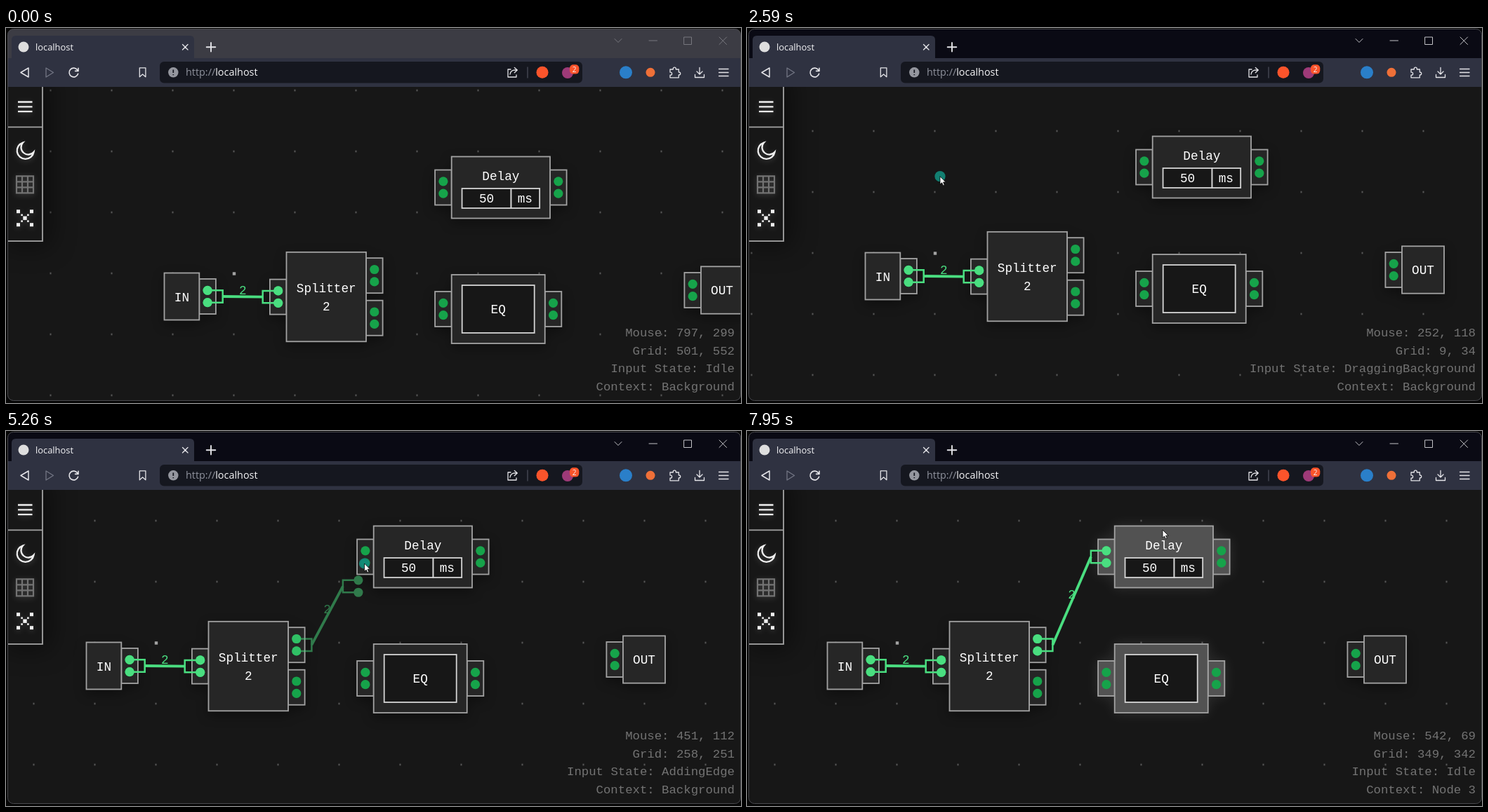
An HTML page that plays this animation: 1047x535 px, repeating every 8000 ms.

```html
<!DOCTYPE html>
<html lang="en">
<head>
<meta charset="utf-8">
<title>Audio graph editor</title>
<style>
html, body { margin: 0; width: 100%; height: 100%; overflow: hidden; background: #060606; }
svg { display: block; width: 1047px; height: 535px; }
.ui { font-family: "Open Sans", "Noto Sans", sans-serif; fill: #f4f4f6; }
.mono { font: 17.7px "Liberation Mono", "Noto Sans Mono", monospace; fill: #fff; text-anchor: middle; }
.status { font: 17.32px "Liberation Mono", "Noto Sans Mono", monospace; fill: #737373; text-anchor: end; }
.ico { fill: none; stroke: #e4e4e8; stroke-width: 1.3; stroke-linejoin: round; stroke-linecap: round; }
.node { filter: drop-shadow(0 6px 8px rgba(0,0,0,.35)); }
.box { fill: #262626; stroke: #a3a3a3; stroke-width: 1.8; }
.inset { fill: #171717; stroke: #d4d4d4; stroke-width: 1.8; }
.port { fill: #16a34a; }
.port.on { fill: #4ade80; }
.node.sel { filter: drop-shadow(0 0 9px rgba(255,255,255,.1)); }
.sel .box { fill: #525252; }
.edge { fill: none; stroke: #4ade80; stroke-width: 2.5; }
.edge .wire { stroke-width: 3.8; }
.edge text { fill: #4ade80; stroke: none; }
.edge circle { fill: #4ade80; stroke: none; }
</style>
</head>
<body>
<svg id="stage" viewBox="0 0 1047 535"></svg>
<script>
const LOOP = 8000, SCALE = 1.0875, PAN_SCALE = 1.08, LAG = 80;
const GRAB = 1950, PAN_END = 3030, DROP = 3200, CONNECT = 4940, SNAP = 5500, CONFIRM = 6140;
const PICK_DELAY = 7200, PICK_EQ = 7500;
const $ = id => document.getElementById(id);
const rect = (x, y, w, h, attrs = '') => `<rect x="${x}" y="${y}" width="${w}" height="${h}" ${attrs}/>`;
const dot = (x, y, r, attrs = '') => `<circle cx="${x}" cy="${y}" r="${r}" ${attrs}/>`;
const path = (d, attrs = '') => `<path d="${d}" ${attrs}/>`;
const label = (x, y, s) => `<text class="mono" x="${x}" y="${y}">${s}</text>`;
const clamp = (v, a, b) => Math.min(b, Math.max(a, v));
const smooth = u => u * u * (3 - 2 * u);

// Cursor moves: start, end, destination
const home = [870, 409.5];
const moves = [
  [160, 900, 94, 66], [1660, GRAB, 334.75, 242.7], [GRAB, 2590, 275, 211.7], [2590, PAN_END, 223, 194],
  [3220, 4200, 400, 292], [4290, 4550, 405, 306], [CONNECT, 5260, 510.5, 189], [SNAP, 5740, 439.3, 200],
  [6380, 6740, 545, 166], [6800, 7160, 575, 141], [7190, 7450, 600, 320], [7560, 7950, 592, 141]];

function cursorAt(t) {
  let [x, y] = home;
  for (const [a, b, tx, ty] of moves) {
    const k = smooth(clamp((t - a) / (b - a), 0, 1));
    x += (tx - x) * k;
    y += (ty - y) * k;
  }
  return [x, y];
}
// The app sees the pointer late, in page units
function mouseAt(t) {
  const [x, y] = cursorAt(t - LAG);
  return [(x - 3) / SCALE, Math.max(0, (y - 84) / SCALE)];
}
function panAt(t) {
  const [x0, y0] = mouseAt(GRAB + LAG), [x, y] = mouseAt(clamp(t, GRAB + LAG, PAN_END + LAG));
  return [296 + x - x0, 245 + y - y0];
}
const panEnd = panAt(LOOP);

const PORT_GAP = 8.7, SOCKET = 11.8;
function socket(x, y) {
  const port = s => dot(x, y + s * PORT_GAP, 6.6, 'class="port"');
  return rect(x - SOCKET, y - 25, 2 * SOCKET, 50, 'class="box"') + port(-1) + port(1);
}
const inset = (x, y, w, h) => rect(x, y, w, h, 'class="inset"');

// Nodes: body box, socket heights on each side, inner content around the centre
const specs = [
  { id: 'in', x: 114.5, y: 301.5, w: 49.8, h: 67, ins: [], outs: [335], body: c => label(c, 341.5, 'IN') },
  { id: 'splitter', x: 288.5, y: 271.8, w: 113.5, h: 127.5, ins: [335.6], outs: [305.2, 365.7],
    body: c => label(c, 329, 'Splitter') + label(c, 355, '2') },
  { id: 'delay', x: 523.7, y: 135.5, w: 140.3, h: 88, ins: [179.5], outs: [179.5],
    body: c => label(c, 168.5, 'Delay') + inset(c - 55.3, 181, 70, 28) + inset(c + 14.7, 181, 40.6, 28) +
      label(c - 20.3, 201, '50') + label(c + 34.5, 201, 'ms') },
  { id: 'eq', x: 523.7, y: 304, w: 133, h: 98, ins: [353], outs: [353],
    body: c => inset(c - 51.5, 319, 103, 68) + label(c, 359, 'EQ') },
  { id: 'out', x: 879, y: 292.3, w: 60, h: 67.4, ins: [326], outs: [], body: c => label(c, 332, 'OUT') }];

const drawNode = ({ id, x, y, w, h, ins, outs, body }) => `<g class="node" id="${id}">` +
  ins.map(v => socket(x - SOCKET, v)).join('') + outs.map(v => socket(x + w + SOCKET, v)).join('') +
  rect(x, y, w, h, 'class="box"') + body(x + w / 2) + '</g>';
const outPort = n => [n.x + n.w + SOCKET, n.outs[0]];
const inPort = n => [n.x - SOCKET, n.ins[0]];

function edge([x0, y0], [x1, y1]) {
  const h = PORT_GAP, a = x0 + 21.6, b = x1 - 22;
  const ends = [[x0, y0], [x1, y1]].map(([x, y]) => dot(x, y - h, 6.6) + dot(x, y + h, 6.6)).join('');
  return path(`M${x0} ${y0 - h}H${a}V${y0 + h}H${x0}M${x1} ${y1 - h}H${b}V${y1 + h}H${x1}`) +
    path(`M${a} ${y0}L${b} ${y1}`, 'class="wire"') + ends + label((a + b) / 2, (y0 + y1) / 2 - 3.4, '2');
}

// Block lettering stroked on a 12 by 17 cell
const glyphs = {
  N: 'M1.5 17V0M10.5 0V17M3 5h1.5v2h1.5v2h1.5v2h1.5',
  O: 'M1.5 1.5H10.5V15.5H1.5Z',
  C: 'M10.5 5V1.5H1.5V15.5H10.5V12',
  E: 'M12 1.5H0M1.5 0V17M0 15.5H12M3 7.5H10',
  T: 'M0 1.5H12M6 0V17M1 3v1M11 3v1',
  I: 'M0 1.5H12M6 0V17M0 15.5H12'
};
function banner(text) {
  let x = 0, out = '';
  for (const c of text) {
    if (glyphs[c]) out += path(glyphs[c], `transform="translate(${x})"`);
    x += glyphs[c] ? 14 : 6.1;
  }
  return `<g role="img" aria-label="${text}" fill="none" stroke="#e11d48" stroke-width="3" stroke-linejoin="bevel"
    transform="translate(188 226.5) scale(3.872 3.8)">${out}</g>`;
}

function sidebar() {
  const square = (x, y, s) => rect(x - s / 2, y - s / 2, s, s);
  let cross = square(27, 271.2, 5.4), grid = '';
  for (const sx of [-1, 1]) for (const sy of [-1, 1])
    cross += square(27 + sx * 9.5, 271.2 + sy * 9.5, 5) + square(27 + sx * 4.4, 271.2 + sy * 4.4, 2.6);
  for (let i = 0; i < 4; i++) grid += `M${15 + 8 * i} 210.2v26.2M13.9 ${211.3 + 8 * i}h26.2`;
  return `<g style="filter:drop-shadow(10px 6px 18px rgba(0,0,0,.45))">` +
    rect(-10, 60, 62, 244, 'fill="#171717" stroke="#a3a3a3" stroke-width="1.8"') + '</g>' +
    path('M0 141.3H52', 'stroke="#a3a3a3" stroke-width="1.8"') +
    `<g style="filter:drop-shadow(0 2px 4px rgba(255,255,255,.2))">` +
    path('M17 105.5h20.5M17 112.3h20.5M17 119.1h20.5', 'stroke="#f0f0f0" stroke-width="2.3"') +
    path('M24 163.5A12 12 0 1 0 39.5 177A10 10 0 0 1 24 163.5Z', 'fill="none" stroke="#f0f0f0" stroke-width="2.3"') +
    path(grid, 'stroke="#737373" stroke-width="2.2"') + `<g fill="#f0f0f0">${cross}</g></g>`;
}

function chrome() {
  return rect(2.5, 1.5, 1044, 530, 'rx="8" id="title"') +
    path('M8 43V17q0-6 6-6H262q6 0 6 6V43Z', 'fill="#2f3241"') + rect(3, 43, 1043.5, 41, 'fill="#2f3241"') +
    dot(25, 27, 7.5, 'fill="#dedede" id="favicon"') +
    '<text class="ui" x="42" y="31.6" font-size="12.9">localhost</text>' +
    path('M251.5 23.5l7.5 7.5M259 23.5l-7.5 7.5', 'class="ico"') +
    path('M292 21v12.6M285.7 27.3h12.6', 'class="ico" style="stroke-width:1.9"') +
    `<g class="ico" id="controls" style="stroke-width:1">${path('M867 15.5l5 5 5-5M916 18h11.5M966 13h10.5v10.5H966zM1016 13l10.5 10.5M1026.5 13L1016 23.5')}</g>` +
    rect(81.5, 48, 30.5, 30.5, 'rx="4" fill="#45485a" id="hover"') +
    path('M32 57v13l-11-6.5z', 'class="ico" style="stroke-width:1.5"') +
    path('M57 57v13l10.5-6.5z', 'class="ico" style="stroke:#737684"') +
    path('M102.6 65.2a6.4 6.4 0 1 1-.8-5.2M103 57.2v4.2h-4.4', 'class="ico" style="stroke-width:1.6"') +
    path('M190.3 56.8h8.6v13l-4.3-3.8-4.3 3.8z', 'class="ico"') +
    rect(219, 48, 602, 30.5, 'rx="6" fill="#15171f"') +
    dot(238.3, 63.3, 7.2, 'fill="#95979f"') + path('M238.3 59.5v4.4M238.3 66v1.3', 'stroke="#15171f" stroke-width="1.7"') +
    '<text class="ui" x="256" y="68.2" font-size="14.4"><tspan fill="#8f929d">http://</tspan><tspan font-weight="500">localhost</tspan></text>' +
    path('M719 59h-4v11h12v-3M718 66q1-6 7-6h2M724.3 56.5l4 3.5-4 3.8', 'class="ico"') +
    path('M743 55.5v16', 'stroke="#5a5c68"') +
    dot(764, 63.3, 8.5, 'fill="#fb542b"') + dot(800, 64, 8, 'fill="#9e3a78"') +
    rect(803, 52.3, 13.3, 13.3, 'rx="5" fill="#fb542b"') +
    '<text class="ui" x="809.7" y="62.6" font-size="10" text-anchor="middle">2</text>' +
    dot(883, 63.3, 9, 'fill="#2a7fc9"') + dot(918, 63.3, 6.5, 'fill="#ef7038"') +
    path('M946 59h4.3v-.8a2 2 0 0 1 4 0v.8h4v4h.4a2 2 0 0 1 0 4h-.4v3.8H946v-3.6h.6a2 2 0 0 0 0-4H946z', 'class="ico"') +
    path('M988 56.5v9M984 62l4 4 4-4M981.5 66.5v4h13v-4', 'class="ico"') +
    path('M1015.5 58.5h13.5M1015.5 63.5h13.5M1015.5 68.5h13.5', 'class="ico"');
}

const [input, splitter, delay] = specs;
const lines = [0, 1, 2, 3];
$('stage').innerHTML = `
  <defs>
    <clipPath id="view"><path d="M3 84H1046V524q0 7-7 7H10q-7 0-7-7Z"/></clipPath>
    <pattern id="dots" patternUnits="userSpaceOnUse" x="-4" y="84.5" width="87" height="87">${rect(42.5, 42.5, 2, 2, 'fill="#6b6b6b"')}</pattern>
  </defs>
  ${rect(0, 0, 1047, 535, 'fill="#060606"')}${chrome()}
  <g clip-path="url(#view)">
    <g id="page">
      ${rect(-30, 50, 1107, 515, 'fill="#171717"')}
      <g id="pan">
        ${rect(-180, -40, 1300, 660, 'fill="url(#dots)"')}
        <g id="graph">
          ${rect(211.8, 300.3, 4.4, 4.4, 'fill="#a3a3a3"')}${specs.map(drawNode).join('')}
          <g class="edge">${edge(outPort(input), inPort(splitter))}</g>
          <g class="edge" id="link"></g>
        </g>
      </g>
      <g id="info">${lines.map(i => `<text class="status" id="s${i}" x="1038" y="${440 + 25.5 * i}"></text>`).join('')}</g>
      ${sidebar()}
    </g>
    <g id="alert">${banner('NO CONNECTION')}
      ${rect(469, 342, 112, 57, 'fill="#2b2b2b" stroke="#fff" stroke-width="2" style="filter:drop-shadow(0 3px 4px rgba(255,255,255,.2))"')}
    </g>
  </g>
  ${rect(2.5, 1.5, 1044, 530, 'rx="8" fill="none" stroke="#4a4a4e"')}
  <g id="cursor">
    ${dot(0, 0, 7.6, 'fill="#12897a" opacity=".92" id="press"')}
    ${path('M0 0V11.4L2.6 9 4.4 13 6.3 12.2 4.6 8.2H8.2Z', 'fill="#fff" stroke="#000" stroke-width=".8"')}
  </g>`;

const show = (id, on) => $(id).style.display = on ? '' : 'none';
const within = (t, a, b) => t >= a && t < b;
const clicked = (t, at) => within(t, at - 30, at + 50);

function draw(t) {
  const focused = t >= 160, loading = within(t, 1020, 1640), offline = within(t, 1080, 1600);
  const dragging = within(t, GRAB, DROP), adding = within(t, CONNECT, SNAP);
  const [mx, my] = mouseAt(t), [cx, cy] = cursorAt(t), [px, py] = panAt(t);
  const ox = Math.round((px - panEnd[0]) * PAN_SCALE), oy = Math.round((py - panEnd[1]) * PAN_SCALE);
  const sx = 3 + mx * SCALE, sy = 84 + my * SCALE;

  $('title').setAttribute('fill', focused ? '#0a0a14' : '#3c3c44');
  $('controls').style.stroke = focused ? '#c4c4c8' : '#77777e';
  $('favicon').setAttribute('r', loading ? 4.8 : 7.5);
  show('hover', within(cx, 81, 112) && within(cy, 48, 79));

  $('pan').setAttribute('transform', loading ? 'translate(5 -1)' : `translate(${ox} ${oy})`);
  $('page').style.filter = offline ? 'blur(4px) brightness(.5)' : 'none';
  show('graph', !loading);
  show('info', !loading);
  show('alert', offline);

  show('link', t >= CONNECT);
  $('link').innerHTML = edge(outPort(splitter), adding ? [sx + 7.5, sy + 14.7] : inPort(delay));
  $('link').style.opacity = t < CONFIRM ? .5 : 1;
  $('delay').classList.toggle('sel', t >= PICK_DELAY);
  $('eq').classList.toggle('sel', t >= PICK_EQ);

  const over = dragging ? -1 : specs.findIndex(n =>
    within(sx - ox, n.x, n.x + n.w) && within(sy - oy, n.y, n.y + n.h));
  const state = dragging ? 'DraggingBackground' : adding ? 'AddingEdge' : 'Idle';
  const pair = (a, b) => `${Math.floor(a)}, ${Math.floor(b)}`;
  [`Mouse: ${pair(mx, my)}`, `Grid: ${pair(mx - px, mx - py)}`, `Input State: ${state}`,
    `Context: ${over < 0 ? 'Background' : 'Node ' + (over + 1)}`].forEach((s, i) => $('s' + i).textContent = s);

  show('cursor', focused);
  $('cursor').setAttribute('transform', `translate(${cx} ${cy})`);
  show('press', dragging || within(t, 4715, SNAP) || [980, PICK_DELAY, PICK_EQ].some(at => clicked(t, at)));
}

const start = performance.now();
function tick() {
  draw((performance.now() - start) % LOOP);
  requestAnimationFrame(tick);
}
tick();
</script>
</body>
</html>
```
